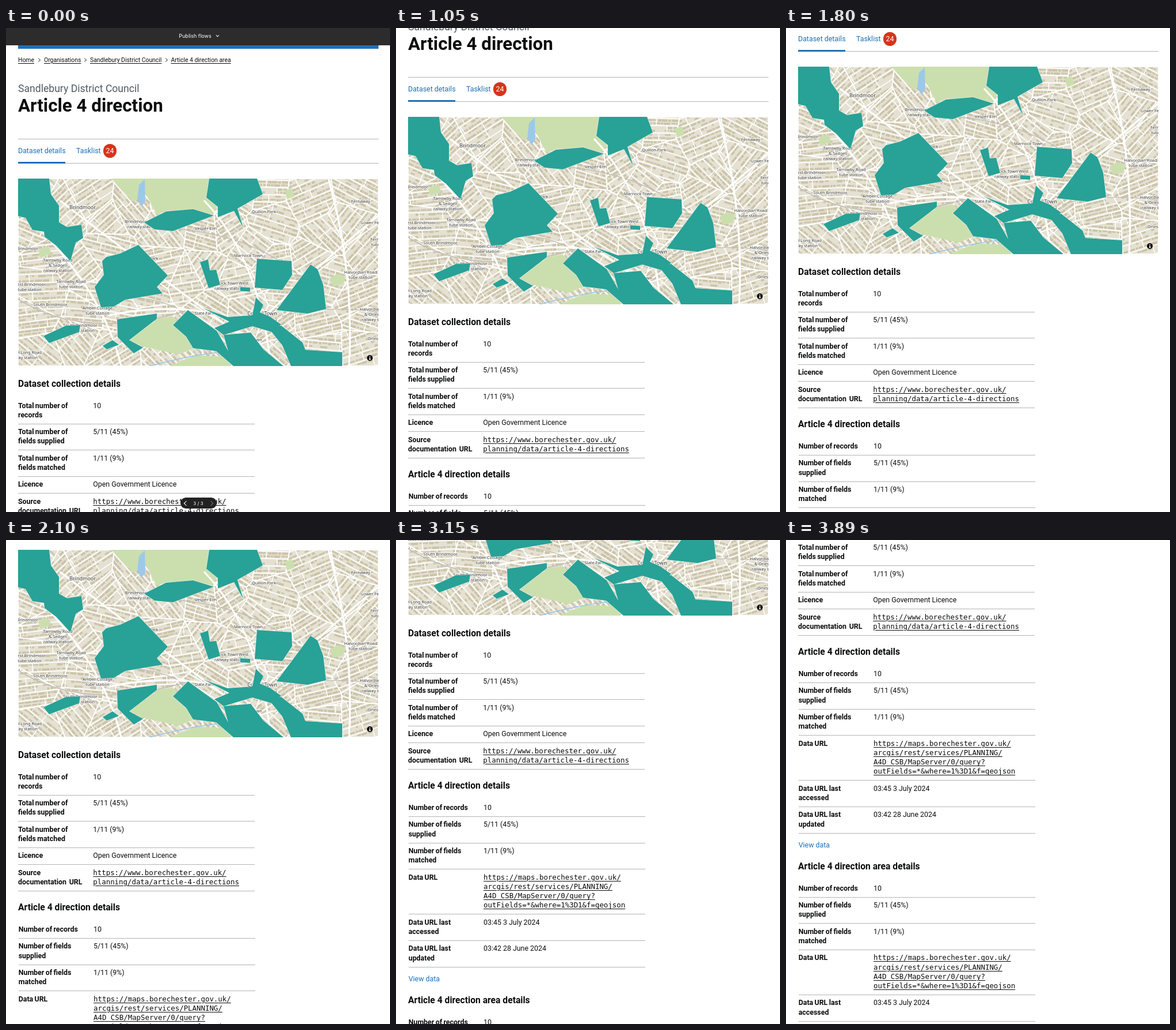
Animation of 667 by 839 pixels, one loop 3.91 s. Source, as an HTML page with a canvas:

```html
<!DOCTYPE html>
<html lang="en">
<head>
<meta charset="utf-8">
<title>Dataset page scroll</title>
<style>
html, body { margin: 0; width: 100%; height: 100%; overflow: hidden; background: #fff; }
#stage { position: relative; width: 667px; height: 839px; overflow: hidden; background: #fff; }
#page { position: absolute; left: 0; top: 0; width: 667px; height: 1600px; will-change: transform; }
#page > *, #pill > * { position: absolute; }
.t { white-space: pre; font: 12.4px/20px Roboto, sans-serif; color: #0b0c0c; }
.b { font-weight: 700; word-spacing: -.06em; }
.h1 { font-size: 31.3px; font-weight: 700; }
.h2 { font-size: 15.65px; font-weight: 700; }
.cap { font-size: 17.6px; color: #505a5f; }
.crumb { font-size: 10.4px; text-decoration: underline; text-underline-offset: 2px; }
.link { color: #1d70b8; }
.url { font-family: "DejaVu Sans Mono", monospace; text-decoration: underline; text-underline-offset: 2px; }
.ui { font: 9px/20px Inter, sans-serif; color: #fff; }
.mid { transform: translateX(-50%); }
.chev { box-sizing: border-box; width: 5px; height: 5px; border: solid #505a5f; border-width: 1px 1px 0 0; transform: rotate(45deg); }
#pill { position: absolute; left: 303px; top: 814px; width: 63px; height: 19px; border-radius: 10px; background: #222; }
#pill .chev { top: 7px; width: 6px; height: 6px; border-color: #fff; }
</style>
</head>
<body>
<div id="stage">
  <div id="page"></div>
  <div id="pill">
    <i class="chev" style="left:7px;transform:rotate(225deg)"></i>
    <span class="t ui mid" style="left:31px;top:0;font-size:8px">3 / 3</span>
    <i class="chev" style="left:50px;opacity:.35"></i>
  </div>
</div>
<script>
const page = document.getElementById('page');
const pill = document.getElementById('pill');

// ---- page building helpers ----
function add(tag, css, cls = '', text = '') {
  const el = document.createElement(tag);
  el.style.cssText = css;
  el.className = cls;
  el.textContent = text;
  page.append(el);
  return el;
}
const box = (x, y, w, h, color, extra = '') =>
  add('div', `left:${x}px;top:${y}px;width:${w}px;height:${h}px;background:${color};${extra}`);
const put = (text, x, y, cls = '') => add('span', `left:${x}px;top:${y - 10}px`, 't ' + cls, text);
const rule = (y, x = 21, w = 626) => box(x, Math.round(y), w, 1, '#b1b4b6');

// ---- page top ----
const BLUE = '#1d70b8';
box(0, 0, 667, 30, '#2c2c2c');
put('Publish flows', 328.5, 14, 'ui mid');
add('i', 'left:365.5px;top:10.5px;width:3.5px;height:3.5px;border-color:#fff;transform:rotate(135deg)', 'chev');
box(21, 30, 626, 6, BLUE);

[['Home', 21], ['Organisations', 66], ['Sandlebury District Council', 146], ['Article 4 direction area', 286.5]]
  .forEach(([text, x], i) => {
    put(text, x, 55.5, 'crumb');
    if (i) add('i', `left:${x - 12}px;top:53px`, 'chev');
  });

put('Sandlebury District Council', 21, 105, 'cap');
put('Article 4 direction', 21, 135, 'h1');
rule(191.5);
rule(234);
put('Dataset details', 21, 213, 'link');
box(21, 232, 81.5, 3, BLUE);
put('Tasklist', 122, 213, 'link');
box(168.7, 201.2, 23.6, 23.6, '#d4351c', 'border-radius:50%');
put('24', 180.5, 213, 'mid').style.color = '#fff';

// ---- detail tables ----
const PITCH = 16.3;
function section(title, top, x, rows) {
  put(title, 21, top, 'h2');
  let y = top + 38;
  for (const [label, value, cls] of rows) {
    const a = label.split('\n'), b = value.split('\n');
    a.forEach((s, i) => put(s, x, y + i * PITCH, 'b'));
    b.forEach((s, i) => put(s, x + 130.3, y + i * PITCH, cls));
    y += (Math.max(a.length, b.length) - 1) * PITCH + 15;
    rule(y, x, 411);
    y += 14.3;
  }
}
const dataRows = [
  ['Number of records', '10'],
  ['Number of fields\nsupplied', '5/11 (45%)'],
  ['Number of fields\nmatched', '1/11 (9%)'],
  ['Data URL', 'https://maps.borechester.gov.uk/\narcgis/rest/services/PLANNING/\nA4D_CSB/MapServer/0/query?\noutFields=*&where=1%3D1&f=geojson', 'url'],
  ['Data URL last\naccessed', '03:45 3 July 2024'],
  ['Data URL last\nupdated', '03:42 28 June 2024']
];
section('Dataset collection details', 616.5, 21, [
  ['Total number of\nrecords', '10'],
  ['Total number of\nfields supplied', '5/11 (45%)'],
  ['Total number of\nfields matched', '1/11 (9%)'],
  ['Licence', 'Open Government Licence'],
  ['Source\ndocumentation  URL', 'https://www.borechester.gov.uk/\nplanning/data/article-4-directions', 'url']
]);
section('Article 4 direction details', 881, 21.7, dataRows);
put('View data', 21.7, 1215.5, 'link');
section('Article 4 direction area details', 1252.7, 21.7, dataRows);

// ---- map ----
const MAP = { x: 21, y: 261, w: 626, h: 325 };
const dpr = window.devicePixelRatio || 1;
const canvas = add('canvas', `left:${MAP.x}px;top:${MAP.y}px;width:${MAP.w}px;height:${MAP.h}px`);
canvas.width = MAP.w * dpr;
canvas.height = MAP.h * dpr;
const g = canvas.getContext('2d');

let seed = 41;
const rnd = (a = 0, b = 1) => {
  seed = (seed * 16807) % 2147483647;
  return a + (b - a) * seed / 2147483647;
};
const points = s => s.split(' ').map(p => p.split(',').map(Number));

function trace(pts) {
  g.beginPath();
  pts.forEach(p => g.lineTo(...p));
  g.closePath();
}
function area(s, color) {
  trace(points(s));
  g.fillStyle = color;
  g.fill();
}
// curve from a to b, pulled towards c
function road(s, width, color) {
  const [a, c, b] = points(s);
  g.beginPath();
  g.moveTo(...a);
  g.quadraticCurveTo(...c, ...b);
  g.lineWidth = width;
  g.strokeStyle = color;
  g.stroke();
}

// part of a polygon that lies nearer to p than to q
function nearer(poly, p, q) {
  const side = v => (v[0] - (p[0] + q[0]) / 2) * (q[0] - p[0]) + (v[1] - (p[1] + q[1]) / 2) * (q[1] - p[1]);
  return poly.flatMap((a, i) => {
    const b = poly[(i + 1) % poly.length], da = side(a), db = side(b);
    const out = da <= 0 ? [a] : [];
    if (da * db < 0) {
      const t = da / (da - db);
      out.push([a[0] + t * (b[0] - a[0]), a[1] + t * (b[1] - a[1])]);
    }
    return out;
  });
}

// one neighbourhood: parallel streets with houses on both sides
function district(poly, [cx, cy]) {
  g.save();
  trace(poly);
  g.clip();
  g.translate(cx, cy);
  g.rotate(rnd(-.9, .9));
  const gap = rnd(12, 16), R = 85;
  for (let v = -R; v < R; v += gap) {
    g.fillStyle = '#cbc3a9';
    for (const off of [1.8, gap - 5.4])
      for (let u = -R; u < R;) {
        const w = rnd(3, 13);
        if (rnd() < .8) g.fillRect(u, v + off, w, rnd(2.4, 4.2));
        u += w + rnd(.5, 2.5);
      }
    g.fillStyle = '#fff';
    g.fillRect(-R, v - .8, 2 * R, 1.6);
    for (let u = -R + rnd(0, 40); u < R; u += rnd(34, 62)) g.fillRect(u, v, 1.5, gap);
  }
  g.restore();
  trace(poly);
  g.lineWidth = 1.8;
  g.strokeStyle = '#fff';
  g.stroke();
}

const LABELS = [
  ['Brindmoor', 133, 311, 9], ['Fernaway', 616, 301], ['Brindmoor Ridge\nrailway station', 236, 336],
  ['Vesper Elm', 347, 348], ['Quillon Park', 448, 319], ['Lower Fernaway', 645, 338],
  ['Fernaway Rd\ntube station', 655, 367], ['Marnock Town', 421, 395],
  ['Tarrowby Road\n& Sedgell\nrailway station', 90, 403], ['Tarrowby Road\ntube station', 113, 440],
  ['West Brindmoor', 28, 383], ['West Brindmoor\ntube station', 41, 445], ['South Brindmoor', 77, 480],
  ['Amber Cottage\ntube station', 159, 486], ['South Brindmoor\nrailway station', 129, 516],
  ['Aldwen Long Road\nrailway station', 30, 563], ['Slate Farm', 346, 495], ['Corvel Town', 445, 495, 9],
  ['Corvel Road', 450, 508], ['Corvel Town', 424, 541], ['Marnock Town West\nrailway station', 387, 443],
  ['Halvordian Road\ntube station', 616, 424], ['Halvordian Road\n& Orlesbury\nrailway station', 643, 488],
  ['Orlesbury', 645, 539], ['Linden Park', 244, 400]
];

// corners of the highlighted areas
const ZONES = [
  '21,261 75,261 78,288 92,308 92,337 106,345 131,341 134,364 121,372 112,404 87,377 67,362 66,353 46,350 34,329 21,326',
  '174,397 198,391 230,376 281,429 262,449 272,460 207,471 187,483 165,484 154,449 170,428 167,404',
  '240,337 278,318 325,314 361,325 290,352 258,349',
  '353,261 436,261 446,288 402,313 412,346 396,317 368,328 368,310 348,294',
  '337,406 351,401 354,420 365,419 372,445 352,451',
  '436,400 496,404 497,428 480,454 432,450',
  '529,410 541,418 551,445 556,487 524,495 470,489',
  '65,534 104,516 129,515 127,527 75,546',
  '168,551 185,541 196,549 175,557',
  '193,505 262,495 262,504 214,541 238,554 222,564 194,536',
  '407,449 424,450 424,457 407,456',
  '290,515 316,489 366,525 386,560 378,532 425,528 447,557 482,586 395,586 365,560 325,555 313,535',
  '343,486 385,501 428,498 434,467 447,480 441,493 458,500 478,514 462,527 428,517 378,532 362,520 388,509',
  '455,519 478,516 515,545 520,558 584,562 584,586 495,586 480,550'
];

function drawMap() {
  g.scale(dpr, dpr);
  g.translate(-MAP.x, -MAP.y);
  g.fillStyle = '#e5e1d2';
  g.fillRect(MAP.x, MAP.y, MAP.w, MAP.h);
  g.lineJoin = g.lineCap = 'round';

  const sites = [];
  for (let j = 0; j < 6; j++)
    for (let i = 0; i < 9; i++)
      sites.push([MAP.x + (i + rnd(.1, .9)) * 69.6, MAP.y + (j + rnd(.1, .9)) * 54.2]);
  const frame = points('21,261 647,261 647,586 21,586');
  sites.forEach(p => district(sites.reduce((poly, q) => q === p ? poly : nearer(poly, p, q), frame), p));

  // parks and water
  const GREEN = '#cbdfae', WATER = '#9cc8ea';
  ['183,261 355,261 365,310 361,322 280,316 262,324 240,282 222,302',
   '214,541 264,504 290,500 326,555 300,566 238,552',
   '284,586 330,567 380,570 391,586',
   '484,281 497,278 501,292 488,297',
   '562,434 575,426 589,431 586,444 568,448',
   '56,386 70,378 80,390 60,398'].forEach(s => area(s, GREEN));
  area('231,272 241,262 242,300 236,309 228,298', WATER);
  road('250,586 315,568 372,562', 1.6, WATER);

  ['150,474 300,440 395,570', '250,345 430,350 520,440', '21,470 140,545 320,488', '480,500 540,480 647,492']
    .forEach(s => road(s, 1.6, '#c3beb6'));
  ['95,300 250,420 480,586', '50,340 170,460 200,586', '345,300 440,400 460,586', '440,510 520,430 647,325',
   '560,261 605,420 596,586', '180,498 260,480 345,492'].forEach(s => road(s, 3.2, '#fff'));

  g.textAlign = 'center';
  g.textBaseline = 'middle';
  g.fillStyle = '#333';
  g.strokeStyle = 'rgba(255,255,255,.85)';
  g.lineWidth = 1.8;
  for (const [text, x, y, size = 7.3] of LABELS) {
    g.font = `${size}px "Noto Sans", sans-serif`;
    text.split('\n').forEach((s, i) => {
      g.strokeText(s, x, y + i * 8.8);
      g.fillText(s, x, y + i * 8.8);
    });
  }

  g.lineWidth = 1.2;
  g.strokeStyle = '#eef3ea';
  ZONES.forEach(z => { trace(points(z)); g.stroke(); });
  ZONES.forEach(z => area(z, '#28a197'));

  // info button
  g.fillStyle = '#000';
  g.beginPath();
  g.arc(632, 572, 5, 0, 7);
  g.fill();
  g.fillStyle = '#fff';
  g.fillRect(631.2, 568.8, 1.7, 1.5);
  g.fillRect(631.2, 571.2, 1.7, 3.6);
  g.fillRect(630.3, 574.2, 3.5, 1);
}
drawMap();

// ---- scrolling: each swipe moves on in a few steps along a power curve ----
const LOOP = 3910;
const SWIPES = [
  { at: 750, steps: 4, every: 150, by: 165, power: 1.5 },
  { at: 1800, steps: 3, every: 150, by: 78.5, power: .9 },
  { at: 2250, steps: 3, every: 150, by: 209.5, power: 1 },
  { at: 3150, steps: 6, every: 148, by: 234, power: 2.55 }
];
function scrollAt(t) {
  return SWIPES.reduce((sum, s) => {
    const step = Math.floor((t - s.at) / s.every) + 1;
    const part = Math.min(Math.max(step / s.steps, 0), 1);
    return sum + s.by * part ** s.power;
  }, 0);
}

const start = performance.now();
function draw(now) {
  const t = Math.max(0, now - start) % LOOP;
  page.style.transform = `translateY(${-Math.round(scrollAt(t))}px)`;
  pill.style.visibility = t < 900 ? 'visible' : 'hidden';
  requestAnimationFrame(draw);
}
draw(start);
</script>
</body>
</html>
```
